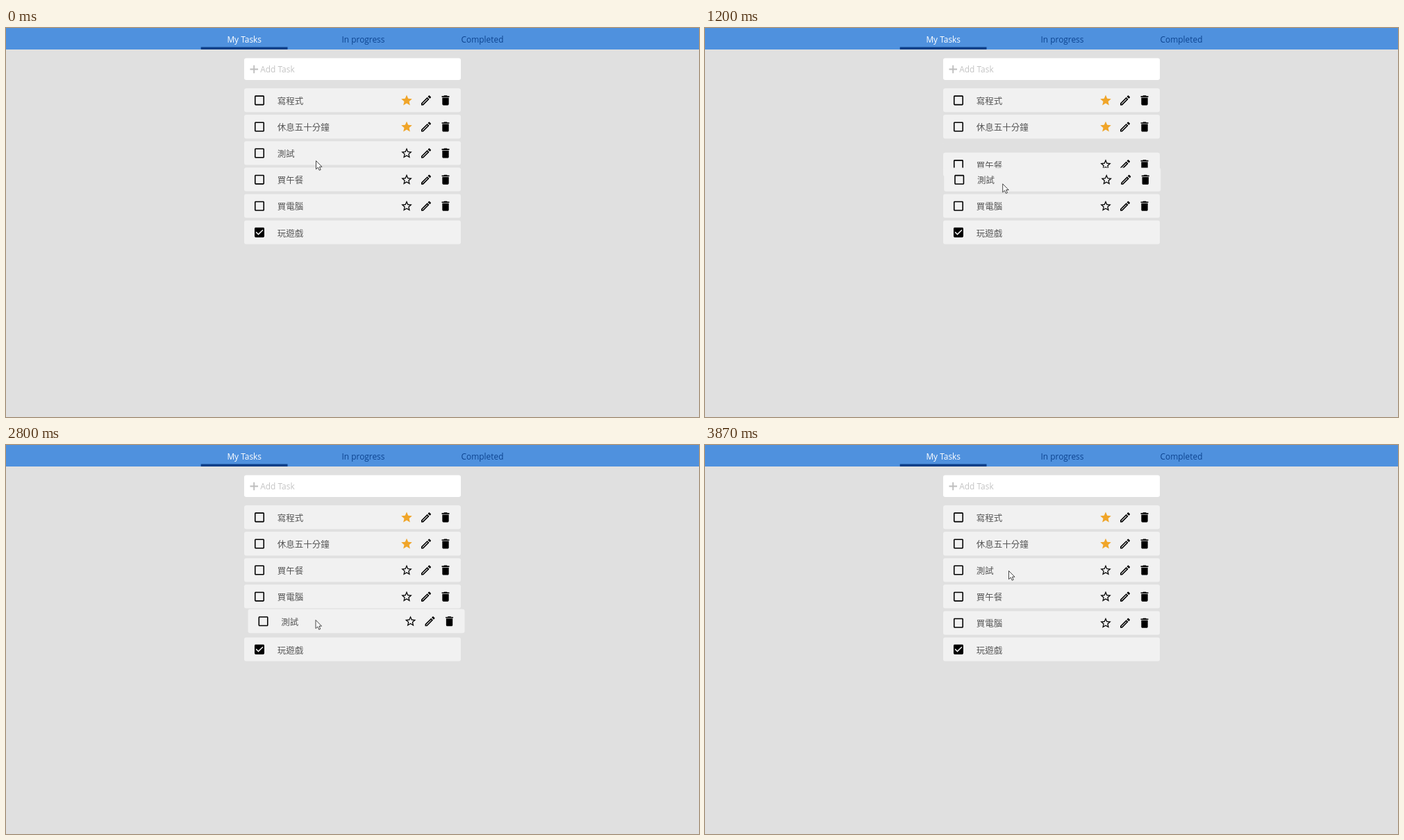
Write an HTML page that moves like this. It is 998 px wide and 561 px high and loops after 3.91 s.

```html
<!DOCTYPE html>
<html lang="zh-Hant">
<head>
<meta charset="utf-8">
<title>Task list</title>
<style>
html, body { margin: 0; width: 100%; height: 100%; overflow: hidden; background: #e0e0e0; }
svg { display: block; }
text { font: 11.9px "Open Sans", "Noto Sans", sans-serif; }
.card text { font: 300 12.5px "Noto Sans CJK TC", "Noto Sans CJK", sans-serif; fill: #555; }
.tab { fill: #0d4490; text-anchor: middle; }
.tab.on { fill: #fff; }
</style>
</head>
<body>
<svg width="998" height="561" viewBox="0 0 998 561">
  <rect width="998" height="31" fill="#4f91de"/>
  <rect x="280.7" y="27.5" width="124.8" height="3.5" fill="#0a3f88"/>
  <text class="tab on" x="343.2" y="20.6">My Tasks</text>
  <text class="tab" x="514.5" y="20.6">In progress</text>
  <text class="tab" x="686" y="20.6">Completed</text>
  <rect x="343" y="43.5" width="312" height="31.5" rx="3" fill="#fff"/>
  <path d="M351.5 59.5h11.5M357.2 53.7v11.5" stroke="#bdbdbd" stroke-width="1.8"/>
  <text x="366.3" y="64.2" fill="#c4c4c4">Add Task</text>
  <g id="list"></g>
  <path id="cursor" d="M.5.5V12.6L3.3 10L5.2 14.2L7.2 13.3L5.4 9.2H9Z" fill="#fff" stroke="#333" stroke-width=".9"/>
</svg>
<script>
const LOOP = 3910, LEFT = 343, SHIFT = 34;
const slot = i => 87 + 38.1 * i;

const icons = {
  box: 'M19 5v14H5V5h14m0-2H5c-1.1 0-2 .9-2 2v14c0 1.1.9 2 2 2h14c1.1 0 2-.9 2-2V5c0-1.1-.9-2-2-2z',
  checked: 'M19 3H5c-1.1 0-2 .9-2 2v14c0 1.1.9 2 2 2h14c1.1 0 2-.9 2-2V5c0-1.1-.9-2-2-2zm-9 14l-5-5 1.4-1.4 3.6 3.6 7.6-7.6L19 8l-9 9z',
  star: 'M12 17.3L18.2 21l-1.6-7L22 9.2l-7.2-.6L12 2 9.2 8.6 2 9.2 7.5 14l-1.7 7z',
  hollow: 'M22 9.2l-7.2-.6L12 2 9.2 8.6 2 9.2 7.5 14l-1.7 7 6.2-3.7 6.2 3.7-1.6-7L22 9.2zM12 15.4l-3.8 2.3 1-4.3-3.3-2.9 4.4-.4L12 6.1l1.7 4 4.4.4-3.3 2.9 1 4.3L12 15.4z',
  pen: 'M14.1 9l.9.9L5.9 19H5v-.9L14.1 9m3.6-6c-.3 0-.5.1-.7.3l-1.8 1.8 3.7 3.7L20.7 7c.4-.4.4-1 0-1.4l-2.3-2.3c-.2-.2-.5-.3-.7-.3zm-3.6 3.2L3 17.3V21h3.8L17.8 9.9l-3.7-3.7z',
  bin: 'M6 19c0 1.1.9 2 2 2h8c1.1 0 2-.9 2-2V7H6v12zM19 4h-3.5l-1-1h-5l-1 1H5v2h14V4z'
};

const icon = (name, cx, fill = '#000') =>
  `<path d="${icons[name]}" fill="${fill}" transform="translate(${cx - 9.36} 8) scale(.78)"/>`;

const list = document.getElementById('list');
const cursor = document.getElementById('cursor');

function place(el, x, y) {
  el.setAttribute('transform', `translate(${x} ${y})`);
}

function addCard(label, row, kind) {
  const g = document.createElementNS('http://www.w3.org/2000/svg', 'g');
  const done = kind === 'done';
  g.setAttribute('class', 'card');
  g.innerHTML = '<rect width="312" height="34.3" rx="3" fill="#f1f1f1"/>' +
    icon(done ? 'checked' : 'box', 22) + `<text x="47.8" y="23">${label}</text>` +
    (done ? '' : icon(kind, 234, kind === 'star' ? '#f0a529' : '#000') + icon('pen', 262) + icon('bin', 290));
  list.append(g);
  place(g, LEFT, slot(row));
  return g;
}

addCard('寫程式', 0, 'star');
addCard('休息五十分鐘', 1, 'star');
addCard('玩遊戲', 5, 'done');
const lunch = addCard('買午餐', 3, 'hollow');
const computer = addCard('買電腦', 4, 'hollow');
const test = addCard('測試', 2, 'hollow');

const mix = (a, b, k) => a + (b - a) * k;
const clamp = k => Math.min(1, Math.max(0, k));
const span = (t, a, b) => clamp((t - a) / (b - a));
const smooth = k => k * k * (3 - 2 * k);

// Eased pointer moves; bow bends the way sideways.
const moves = [
  { from: 820, to: 1570, x: 423.5, y: 262.7, bow: 4 },
  { from: 2130, to: 2600, x: 440, y: 258, bow: 0 },
  { from: 2700, to: 3300, x: 443, y: 178, bow: 10.5 },
  { from: 3800, to: 3870, x: 437, y: 181, bow: 0 }
];

function pointer(t) {
  // One wide circle over the list
  const k = span(t, 30, 300), turn = 2 * Math.PI * k;
  let x = mix(446, 425, k) + 95 * (1 - Math.cos(turn));
  let y = mix(191, 184, k) + 80 * Math.sin(turn);
  for (const m of moves) {
    const p = span(t, m.from, m.to);
    x = mix(x, m.x, smooth(p)) + m.bow * Math.sin(Math.PI * p);
    y = mix(y, m.y, smooth(p));
  }
  return [x, y];
}

// cubic-bezier(.2, 0, 0, 1)
function snappy(k) {
  let lo = 0, hi = 1;
  for (let i = 0; i < 20; i++) {
    const s = (lo + hi) / 2;
    if (.6 * s * (1 - s) ** 2 + s ** 3 < k) lo = s; else hi = s;
  }
  return smooth(lo);
}

const drags = [
  { from: 910, drop: 1830, end: 1900, grab: [427, 186], a: 2, b: 4 },
  { from: 2770, drop: 3600, end: 3700, grab: [440, 254.5], a: 4, b: 2 }
];

function dragged(t) {
  let row = 2;
  for (const d of drags) {
    if (t < d.from) break;
    if (t < d.end) {
      const [px, py] = pointer(Math.min(t, d.drop));
      const k = span(t, d.drop, d.end);
      return [mix(LEFT + px - d.grab[0], LEFT, k), mix(slot(d.a) + py - d.grab[1], slot(d.b), k)];
    }
    row = d.b;
  }
  return [LEFT, slot(row)];
}

// A neighbour slides aside, then settles into its slot on drop.
function neighbour(t, row, up, down) {
  const slide = start => SHIFT * snappy(span(t, start, start + 200));
  if (t < drags[0].end) return slot(row) - slide(up);
  if (t < drags[1].end) return slot(row - 1) + slide(down);
  return slot(row);
}

function draw(t) {
  place(lunch, LEFT, neighbour(t, 3, 1148, 3180));
  place(computer, LEFT, neighbour(t, 4, 1432, 2977));
  place(test, ...dragged(t));
  place(cursor, ...pointer(t));
}

const start = performance.now();
function tick() {
  draw((performance.now() - start) % LOOP);
  requestAnimationFrame(tick);
}
draw(0);
requestAnimationFrame(tick);
</script>
</body>
</html>
```
